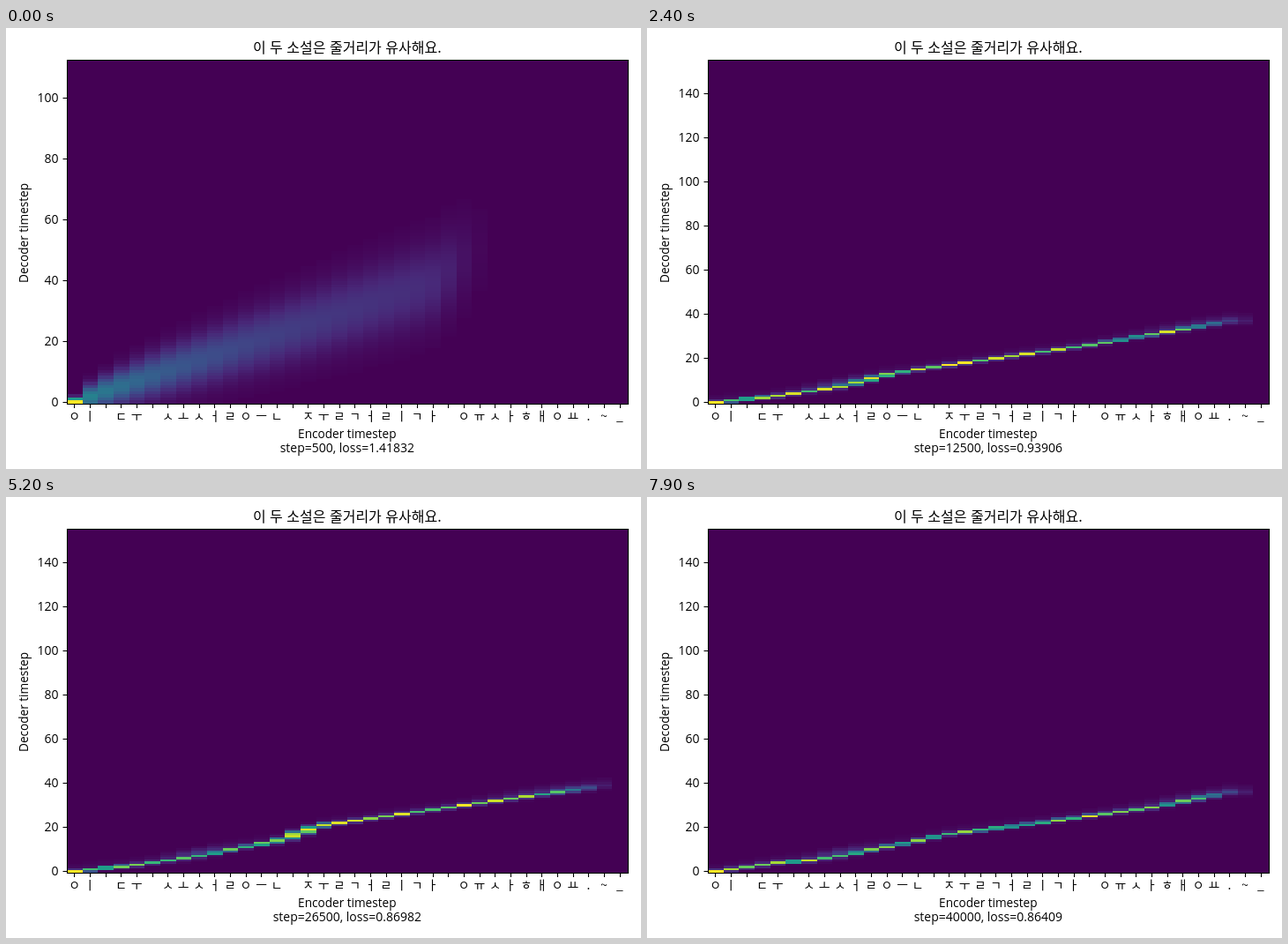
Recreate the animation shown at these times as an HTML page with a canvas. Size 720x500 px, loop 8 s.

```html
<!DOCTYPE html>
<html lang="ko">
<head>
<meta charset="utf-8">
<style>
  html, body { margin: 0; width: 720px; height: 500px; overflow: hidden; background: #fff; }
  canvas, svg { position: absolute; left: 0; top: 0; }
  text { font: 14px "Open Sans", "Noto Sans", sans-serif; fill: #000; }
  .axis { font-size: 13.6px; }
  .title { font: 16px "Noto Sans CJK KR", "Noto Sans CJK", sans-serif; }
  .jamo { font: 13.9px "Noto Sans CJK KR", "Noto Sans CJK", sans-serif; }
  .mid { text-anchor: middle; }
  .end { text-anchor: end; }
  path { stroke: #000; stroke-width: 1.1; fill: none; }
</style>
</head>
<body>
<canvas id="heat" width="720" height="500"></canvas>
<svg id="chart" width="720" height="500"></svg>
<script>
const STEP_MS = 100, STEPS = 80, COLS = 36;
const LEFT = 69, RIGHT = 705, TOP = 36, BOTTOM = 426;
const COL_W = (RIGHT - LEFT) / COLS;
const JAMO = 'ㅇㅣ ㄷㅜ ㅅㅗㅅㅓㄹㅇㅡㄴ ㅈㅜㄹㄱㅓㄹㅣㄱㅏ ㅇㅠㅅㅏㅎㅐㅇㅛ.~_';
const VIRIDIS = ['440154', '482878', '3e4a89', '31688e', '26828e', '1f9e89', '35b779', '6dcd59', 'b4de2c', 'fde725']
  .map(h => [0, 2, 4].map(k => parseInt(h.slice(k, k + 2), 16)));

// Alignment path at a few steps, as column:row points.
const POSES = [
  { at: 0, loss: 1.41832, path: '0:0 23:39 25:47 34:75' },
  { at: 12, loss: 1.05039, path: '0:0 5:5 6:5.2 9:8.5 10:10 14:13 27:25 31:30 34:32' },
  { at: 24, loss: .93906, path: '0:0 4:3 8:7.2 11:12.6 13:15 24:26 29:32 33:37 34:37' },
  { at: 41, loss: .98056, path: '0:0 4:3.2 8:7 14:14.4 24:24 28:28.4 29:30 33:34 34:34' },
  { at: 52, loss: .86982, path: '0:0 4:3 8:7 13:14 15:18.8 16:21 28:33 34:39' },
  { at: 60, loss: .84585, path: '0:0 4:4 9:9.2 13:14.4 15:19 16:21 28:33 34:39' },
  { at: 79, loss: .86409, path: '0:0 4:4 6:5 8:7 13:14 15:17 20:21.3 28:29 33:36 34:36' }
];

const lerp = (a, b, t) => a + (b - a) * t;
const bell = (d, sd) => Math.exp(-d * d / (2 * sd * sd));
const hash = (a, b = 0) => {
  const x = Math.sin(a * 127.1 + b * 311.7 + 7) * 43758.5453;
  return x - Math.floor(x);
};

function along(knots, c) {
  const k = Math.max(1, knots.findIndex(p => p[0] >= c));
  const [a, b] = [knots[k - 1], knots[k]];
  return lerp(a[1], b[1], (c - a[0]) / (b[0] - a[0]));
}

for (const p of POSES) {
  const knots = p.path.split(' ').map(s => s.split(':').map(Number));
  p.rows = Array.from({ length: COLS - 1 }, (_, c) => along(knots, c));
}

function colour(v) {
  const x = Math.min(1, Math.max(0, v)) * 9, k = Math.min(8, Math.floor(x));
  return `rgb(${VIRIDIS[k].map((a, j) => Math.round(lerp(a, VIRIDIS[k + 1][j], x - k)))})`;
}

// Blend the two nearest poses; noise vanishes at the poses themselves.
function stateAt(i) {
  const k = Math.max(1, POSES.findIndex(p => p.at >= i));
  const a = POSES[k - 1], b = POSES[k];
  const u = (i - a.at) / (b.at - a.at);
  const t = k === 1 ? 1 - (1 - u) ** 4 : u;
  const noise = Math.min(1, 8 * u * (1 - u));
  const drift = (hash(i, 3) - .5) * 3 * noise;
  return {
    loss: lerp(a.loss, b.loss, t) + (hash(i) - .5) * .07 * noise,
    rows: a.rows.map((r, c) => lerp(r, b.rows[c], t) + drift * c / 34),
    blur: Math.max(0, 1 - i / 6)
  };
}

// Centre, spread and strength of the attention in one column.
function column(rows, c, i, blur) {
  const slope = (rows[Math.min(34, c + 1)] - rows[Math.max(0, c - 1)]) / 2;
  const fade = 1 / (1 + Math.exp((c - 32) / .9));
  const sharp = {
    sd: .5 + .6 * (1 - fade) + .6 * Math.max(0, slope - 1.3),
    peak: c ? fade * (.65 + .35 * hash(c, i)) : 1
  };
  const broad = {
    sd: .9 + 1.7 * Math.sqrt(c),
    peak: c ? .5 / (1 + .13 * c) / (1 + Math.exp((c - 24.7) * 1.4)) : 1
  };
  return {
    mid: rows[c],
    sd: lerp(sharp.sd, broad.sd, blur * blur),
    peak: lerp(sharp.peak, broad.peak, Math.sqrt(blur)),
    haze: (.03 + .15 * bell(c - 8, 1.2) + .07 * bell(c - 30, 2)) * (1 - blur)
  };
}

const ctx = document.getElementById('heat').getContext('2d');

function drawHeat(i, rowCount, { rows, blur }) {
  const rowH = (BOTTOM - TOP) / rowCount;
  const yOf = r => Math.floor(BOTTOM - r * rowH);
  const xOf = c => Math.round(LEFT + c * COL_W);
  ctx.fillStyle = colour(0);
  ctx.fillRect(LEFT, TOP, RIGHT - LEFT + 1, BOTTOM - TOP);
  for (let c = 0; c < COLS - 1; c++) {
    const { mid, sd, peak, haze } = column(rows, c, i, blur);
    for (let r = 0; r < 90; r++) {
      const v = Math.max(peak * bell(r - mid, sd), haze * bell(r - mid - 1, 1.5));
      if (v < .006) continue;
      ctx.fillStyle = colour(v);
      ctx.fillRect(xOf(c), yOf(r + 1), xOf(c + 1) - xOf(c), yOf(r) - yOf(r + 1));
    }
  }
}

const svg = document.getElementById('chart');
function add(parent, tag, attrs, text = '') {
  const el = document.createElementNS('http://www.w3.org/2000/svg', tag);
  for (const k in attrs) el.setAttribute(k, attrs[k]);
  el.textContent = text;
  return parent.appendChild(el);
}
const label = (parent, cls, x, y, text) => add(parent, 'text', { class: cls, x, y }, text);

const centre = (LEFT + RIGHT) / 2 - .2;
label(svg, 'title mid', centre, 28, '이 두 소설은 줄거리가 유사해요.');
label(svg, 'axis mid', centre, 465, 'Encoder timestep');
const status = label(svg, 'mid', centre, 481, '');
add(svg, 'text', { class: 'axis mid', transform: 'translate(25 232.5) rotate(-90)' }, 'Decoder timestep');
[...JAMO].forEach((ch, c) => {
  const x = LEFT + (c + .5) * COL_W;
  add(svg, 'path', { d: `M${Math.floor(x) + .5} 426v5` });
  label(svg, 'jamo mid', x - .3, 445, ch);
});
add(svg, 'path', { d: 'M69.5 36.5H705.5V426.5H69.5Z' });
const scale = add(svg, 'g', {});

function drawScale(rowCount) {
  scale.replaceChildren();
  for (let n = 0; n < rowCount; n += 20) {
    const y = BOTTOM - (n + .5) * (BOTTOM - TOP) / rowCount;
    add(scale, 'path', { d: `M64.5 ${Math.floor(y) + .5}h5` });
    label(scale, 'end', 59.5, y + 4.6, n);
  }
}

let shown = -1, shownRows = 0;
function tick() {
  const i = Math.floor(performance.now() / STEP_MS) % STEPS;
  if (i !== shown) {
    const rowCount = i ? 156 : 113;
    const state = stateAt(i);
    if (rowCount !== shownRows) drawScale(shownRows = rowCount);
    drawHeat(i, rowCount, state);
    status.textContent = `step=${(i + 1) * 500}, loss=${state.loss.toFixed(5)}`;
    shown = i;
  }
  requestAnimationFrame(tick);
}
tick();
</script>
</body>
</html>
```
